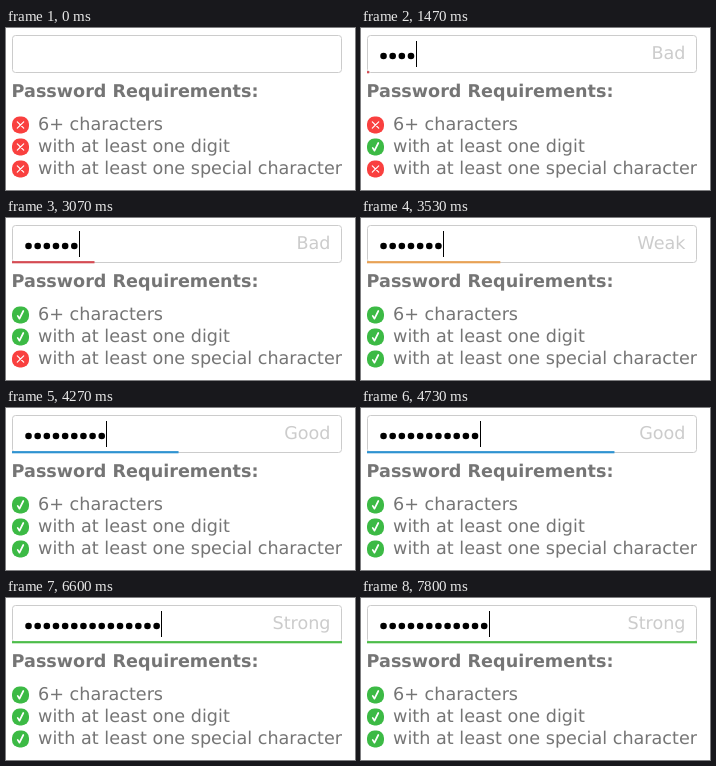
An HTML page that plays this animation: 349 px wide and 162 px high, repeating every 8 s.

```html
<!DOCTYPE html>
<html lang="en">
<head>
<meta charset="utf-8">
<title>Password strength</title>
<style>
html, body { margin: 0; width: 100%; height: 100%; overflow: hidden; background: #fff; }
svg { display: block; width: 349px; height: 162px; }
text { font: 17.6px "DejaVu Sans", Verdana, sans-serif; fill: #757575; text-rendering: geometricPrecision; }
.title { font-weight: bold; }
#label { fill: #ccc; text-anchor: end; }
.mark { fill: none; stroke: #fff; stroke-linecap: round; stroke-linejoin: round; }
</style>
</head>
<body>
<svg viewBox="0 0 349 162">
  <rect x="6.5" y="7.5" width="329" height="37" rx="3" fill="#fff" stroke="#ccc"/>
  <rect id="bar" x="6" y="43.1" height="2.2"/>
  <g id="dots"></g>
  <rect id="caret" y="13" width="1" height="26"/>
  <text id="label" x="324.5" y="31"></text>
  <text class="title" x="5.6" y="69">Password Requirements:</text>
  <g id="rules"></g>
</svg>
<script>
const LOOP = 8000, FPS = 15;
const LEFT = 18.42, PITCH = 9.15, STEP = 82.5, GROW = 500;

// Times in ms: each key adds a dot, each erase removes one.
const keys = [530, 1070, 1130, 1470, 1730, 2070, 3270, 4070, 4270, 4400, 4600, 5070, 5200, 5400, 5600];
const erases = [7470, 7630, 7800];
const caretOff = [[0, 330], [2530, 3070], [3800, 4070], [6130, 6600], [7130, 7470]];
const levels = [
  { at: 1470, grow: 1450, name: "Bad", color: "#d54c54" },
  { at: 3330, grow: 3360, name: "Weak", color: "#e8a256" },
  { at: 4270, grow: 4255, name: "Good", color: "#2f93d1" },
  { at: 5130, grow: 5152, name: "Strong", color: "#4dbd4a" }
];
const rules = [
  { text: "6+ characters", at: 2070 },
  { text: "with at least one digit", at: 600 },
  { text: "with at least one special character", at: 3330 }
];
const states = {
  fail: { fill: "#f9403f", d: "M-3.2 -3.2L3.2 3.2M3.2 -3.2L-3.2 3.2", width: 1.2 },
  pass: { fill: "#3cba45", d: "M-2.8 .9L-1 3.7L2.8 -4", width: 1.7 }
};

const $ = id => document.getElementById(id);

function set(el, attrs) {
  for (const k in attrs) el.setAttribute(k, attrs[k]);
  return el;
}

function add(parent, tag, attrs) {
  const el = document.createElementNS("http://www.w3.org/2000/svg", tag);
  return parent.appendChild(set(el, attrs));
}

const dots = keys.map((_, i) =>
  add($("dots"), "circle", { cx: LEFT + PITCH * (i + 0.45), cy: 28, r: 3.3 }));

rules.forEach((rule, i) => {
  const g = add($("rules"), "g", { transform: `translate(14.5 ${97 + 22 * i})` });
  rule.badge = add(g, "rect", { x: -8.5, y: -8.5, width: 17, height: 17, rx: 7.4 });
  rule.mark = add(g, "path", { class: "mark" });
  add(g, "text", { x: 17.6, y: 5 }).textContent = rule.text;
});

// Standard CSS "ease" curve, solved by bisection.
function ease(x) {
  if (x <= 0) return 0;
  if (x >= 1) return 1;
  const bez = (s, a, b) => 3 * (1 - s) ** 2 * s * a + 3 * (1 - s) * s * s * b + s ** 3;
  let lo = 0, hi = 1;
  for (let i = 0; i < 20; i++) {
    const mid = (lo + hi) / 2;
    if (bez(mid, 0.25, 0.25) < x) lo = mid; else hi = mid;
  }
  return bez(lo, 0.1, 1);
}

function draw(now) {
  // The picture advances in steps of 1/15 s.
  const t = Math.floor((now % LOOP + 5) * FPS / 1000) * 1000 / FPS + 5;
  const passed = list => list.filter(k => k <= t).length;
  const visibility = on => on ? "visible" : "hidden";

  const count = passed(keys) - passed(erases);
  dots.forEach((dot, i) => set(dot, { visibility: visibility(i < count) }));

  const off = caretOff.some(([a, b]) => t >= a && t < b);
  set($("caret"), { x: Math.floor(LEFT + PITCH * count), visibility: visibility(!off) });

  const level = levels.filter(l => l.at <= t).pop();
  const width = levels.reduce((w, l) => w + STEP * ease((t - l.grow) / GROW), 0);
  $("label").textContent = level ? level.name : "";
  set($("bar"), { width, fill: level ? level.color : "none" });

  for (const rule of rules) {
    const state = t >= rule.at ? states.pass : states.fail;
    set(rule.badge, { fill: state.fill });
    set(rule.mark, { d: state.d, "stroke-width": state.width });
  }
}

const start = performance.now();
function tick() {
  draw(performance.now() - start);
  requestAnimationFrame(tick);
}
tick();
</script>
</body>
</html>
```
